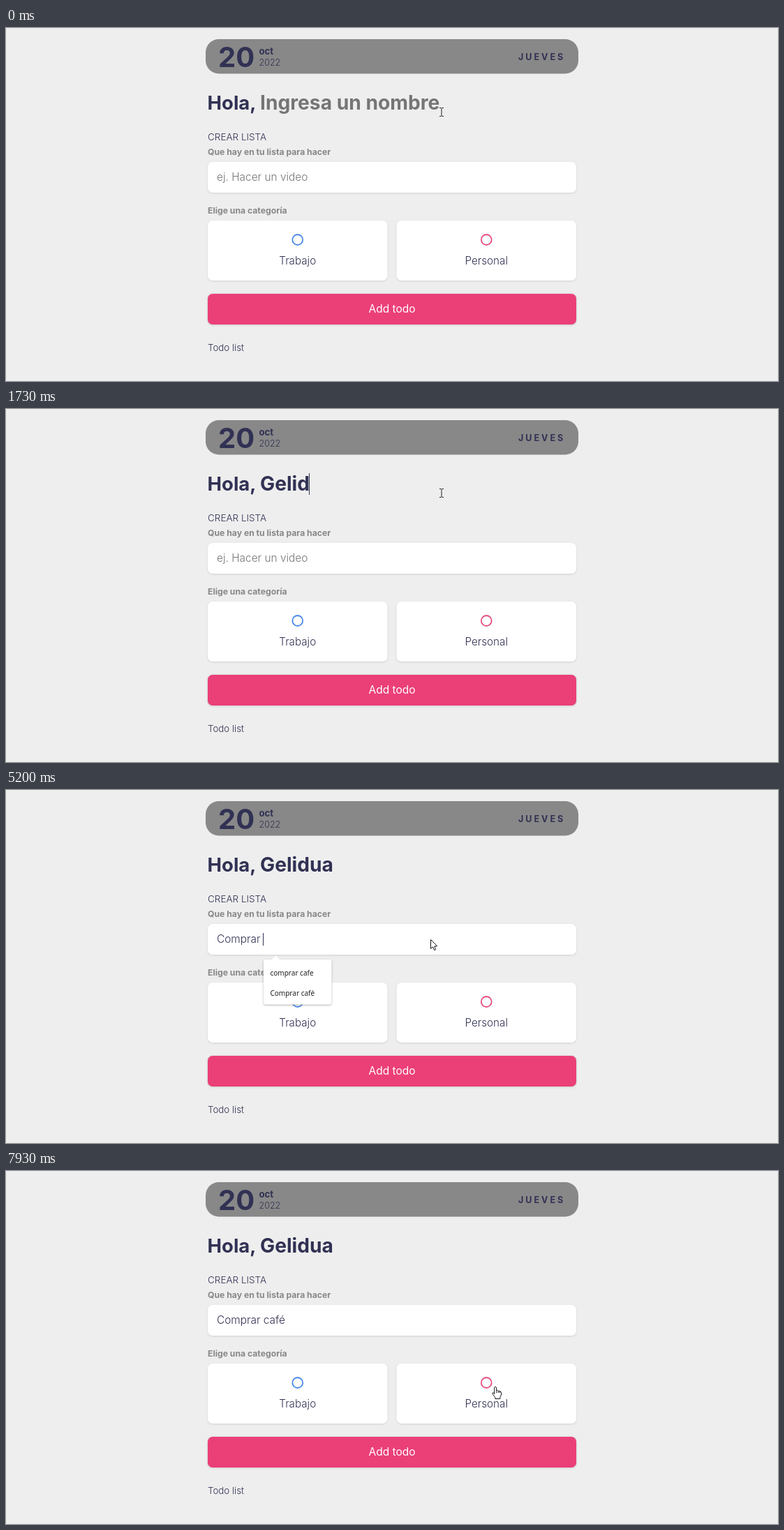
These frames come from a looping animation (1106x506 px, 8 s). An HTML page with a canvas:

```html
<!DOCTYPE html>
<html lang="es">
<head>
<meta charset="utf-8">
<title>Lista de tareas</title>
<style>
  html, body { margin: 0; width: 100%; height: 100%; overflow: hidden; background: #eee; }
  canvas { display: block; }
</style>
</head>
<body>
<canvas id="stage" width="1106" height="506"></canvas>
<script>
const stage = document.getElementById('stage');
const layer = document.createElement('canvas');
layer.width = stage.width;
layer.height = stage.height;
const stageCtx = stage.getContext('2d'), layerCtx = layer.getContext('2d');
let ctx = stageCtx;

const LOOP = 8000, TICK = 1000 / 15;
const NAVY = '#313154', GREY = '#888', HINT = '#757575', PINK = '#eb3f78', BLUE = '#3a82ee';
const SOFT = 'rgba(0,0,0,.12)';
const UI = 'Inter, sans-serif', SYSTEM = '"Noto Sans", sans-serif';
const light = size => `300 ${size}px ${UI}`;
const bold = size => `700 ${size}px ${UI}`;

// All times below are in ticks of 1/15 s.
const nameField = { text: 'Gelidua', keys: [15, 22, 24, 25, 26, 28, 30], hint: 'Ingresa un nombre',
  x: 364, base: 117, font: bold(28.2), caret: [[6, 37]], top: 92, bottom: 123 };
const taskField = { text: 'Comprar café', keys: [63, 65, 68, 70, 72, 74, 76, 78, 83, 84, 88, 95],
  hint: 'ej. Hacer un video', x: 302, base: 219, font: light(15.4),
  caret: [[50, 58], [63, 103], [111, 119]], top: 205, bottom: 223 };

const popups = [
  { from: 6, to: 15, x: 444, y: 130, w: 97,
    items: ['gg', 'ggg', 'gggg', 'hola', 'prueba', 'prueba nueva'] },
  { from: 17, to: 22, fade: true, x: 444, y: 130, w: 58, items: ['gg', 'ggg', 'gggg'] },
  { from: 63, to: 95, fade: true, x: 369, y: 243, w: 97.5, items: ['comprar cafe', 'Comprar café'] }
];

const mousePath = [
  [36, 624, 120], [37, 622, 124], [38, 616, 134], [41, 612, 178], [45, 609, 206], [49, 608, 214],
  [102, 608, 214], [105, 668, 285], [107, 700, 320], [109, 700, 320], [111, 702, 320],
  [114, 702, 320], [115, 701, 312], [117, 701, 312], [118, 702, 310], [119, 701, 309]
];

function label(str, x, y, font, color = NAVY, align = 'left', spacing = 0) {
  ctx.font = font;
  ctx.fillStyle = color;
  ctx.textAlign = align;
  ctx.letterSpacing = spacing + 'px';
  ctx.fillText(str, x, y);
  ctx.letterSpacing = '0px';
}

function box(x, y, w, h, r, color, shadow, blur = 3, drop = 1) {
  ctx.save();
  if (shadow) {
    ctx.shadowColor = shadow;
    ctx.shadowBlur = blur;
    ctx.shadowOffsetY = drop;
  }
  ctx.fillStyle = color;
  ctx.beginPath();
  ctx.roundRect(x, y, w, h, r);
  ctx.fill();
  ctx.restore();
}

function polygon(points) {
  ctx.beginPath();
  points.forEach(([x, y]) => ctx.lineTo(x, y));
  ctx.closePath();
}

function category(x, color, title) {
  const mid = x + 128.75;
  box(x, 276, 257.5, 86, 7, '#fff', SOFT);
  ctx.save();
  ctx.shadowColor = SOFT;
  ctx.shadowBlur = 3;
  ctx.strokeStyle = color;
  ctx.lineWidth = 1.6;
  ctx.beginPath();
  ctx.arc(mid, 303.5, 7.4, 0, Math.PI * 2);
  ctx.stroke();
  ctx.restore();
  label(title, mid, 339, light(15.2), NAVY, 'center');
}

function drawPage() {
  ctx.fillStyle = '#eee';
  ctx.fillRect(0, 0, 1106, 506);

  box(286, 16, 534, 49.5, 19, GREY);
  label('20', 304, 55.5, bold(40));
  label('oct', 362.5, 38, bold(13.2));
  label('2022', 362.5, 53.5, light(12.5));
  label('JUEVES', 734, 45.5, bold(12.5), NAVY, 'left', 3);

  label('Hola,', 288.5, 117, bold(27.5));
  label('CREAR LISTA', 289, 161, light(13.5));
  label('Que hay en tu lista para hacer', 289, 182, bold(12.2), GREY);
  box(289, 192, 528, 44, 7, '#fff', SOFT);

  label('Elige una categoría', 289, 266, bold(12.2), GREY);
  category(289, BLUE, 'Trabajo');
  category(559.5, PINK, 'Personal');

  box(289, 381, 528, 44, 7, PINK, 'rgba(0,0,0,.2)', 3, 0.5);
  label('Add todo', 553, 408, `400 15.5px ${UI}`, '#fff', 'center');
  label('Todo list', 289, 463, light(13.3));
}

function drawField(f, tick) {
  const typed = f.text.slice(0, f.keys.filter(k => k <= tick).length);
  label(typed || f.hint, f.x, f.base, f.font, typed ? NAVY : HINT);
  if (f.caret.some(([on, off]) => tick >= on && tick < off)) {
    ctx.fillStyle = NAVY;
    ctx.fillRect(Math.round(f.x + ctx.measureText(typed).width - 0.5), f.top, 1, f.bottom - f.top);
  }
}

function popupAlpha(p, tick) {
  if (tick < p.from) return 0;
  if (tick < p.to) return 1;
  return p.fade ? Math.max(0, 0.92 - 0.31 * (tick - p.to)) : 0;
}

// The popup is painted opaque on its own layer, so that it fades as one piece.
function drawPopup(p, tick) {
  const alpha = popupAlpha(p, tick);
  if (!alpha) return;
  ctx = layerCtx;
  ctx.clearRect(0, 0, layer.width, layer.height);
  box(p.x, p.y, p.w, 6 + 29.3 * p.items.length, 3, '#fff', 'rgba(0,0,0,.3)', 3);
  ctx.fillStyle = '#fff';
  polygon([[p.x + 11, p.y + 1], [p.x + 17.5, p.y - 5.5], [p.x + 24, p.y + 1]]);
  ctx.fill();
  p.items.forEach((item, i) =>
    label(item, p.x + 9.5, p.y + 22.5 + 29.3 * i, `400 10px ${SYSTEM}`, '#202020'));
  ctx = stageCtx;
  ctx.globalAlpha = alpha;
  ctx.drawImage(layer, 0, 0);
  ctx.globalAlpha = 1;
}

function mouseAt(tick) {
  const next = mousePath.findIndex(k => k[0] >= tick);
  if (next <= 0) return mousePath[0].slice(1);
  const [t0, x0, y0] = mousePath[next - 1], [t1, x1, y1] = mousePath[next];
  const u = (tick - t0) / (t1 - t0);
  return [Math.round(x0 + (x1 - x0) * u), Math.round(y0 + (y1 - y0) * u)];
}

function ibeam() {
  ctx.fillStyle = '#222';
  ctx.fillRect(-0.5, -5, 1, 11);
  for (const y of [-6, 6]) {
    ctx.fillRect(-3, y, 2.5, 1);
    ctx.fillRect(0.5, y, 2.5, 1);
  }
}

function arrow() {
  polygon([[0.5, 0.5], [0.5, 13.5], [3.5, 10.9], [5.6, 15.6], [7.7, 14.7], [5.7, 10.1], [9.7, 9.8]]);
  ctx.fill();
  ctx.stroke();
}

const handShape = new Path2D('M-1.4 11V1.6Q-1.4 .5 0 .5T1.6 1.6V5.8Q3.8 4.8 4.2 6.4' +
  'Q6.1 5.4 6.4 7.2Q8.5 6.6 8.5 8.6V12L6.8 15.2V17.5H-.2V15.6L-3.6 11.2' +
  'Q-4.7 9.4-3.7 8.8Q-2.8 8.5-1.4 10.2');

function hand() {
  ctx.fill(handShape);
  ctx.stroke(handShape);
  ctx.beginPath();
  for (const x of [1.6, 4.2, 6.4]) {
    ctx.moveTo(x, 6.5);
    ctx.lineTo(x, 9);
  }
  ctx.stroke();
}

function drawMouse(tick) {
  const [x, y] = mouseAt(tick);
  ctx.save();
  ctx.translate(x, y);
  ctx.fillStyle = '#fff';
  ctx.strokeStyle = '#15151f';
  ctx.lineWidth = 1;
  ctx.lineJoin = 'round';
  if (tick < 38) ibeam();
  else if (y > 276) hand();
  else arrow();
  ctx.restore();
}

function render(time) {
  const tick = Math.floor((time % LOOP + 5) / TICK) % 120;
  drawPage();
  drawField(nameField, tick);
  drawField(taskField, tick);
  popups.forEach(p => drawPopup(p, tick));
  drawMouse(tick);
}

const start = performance.now();
function loop() {
  render(performance.now() - start);
  requestAnimationFrame(loop);
}
loop();
</script>
</body>
</html>
```
